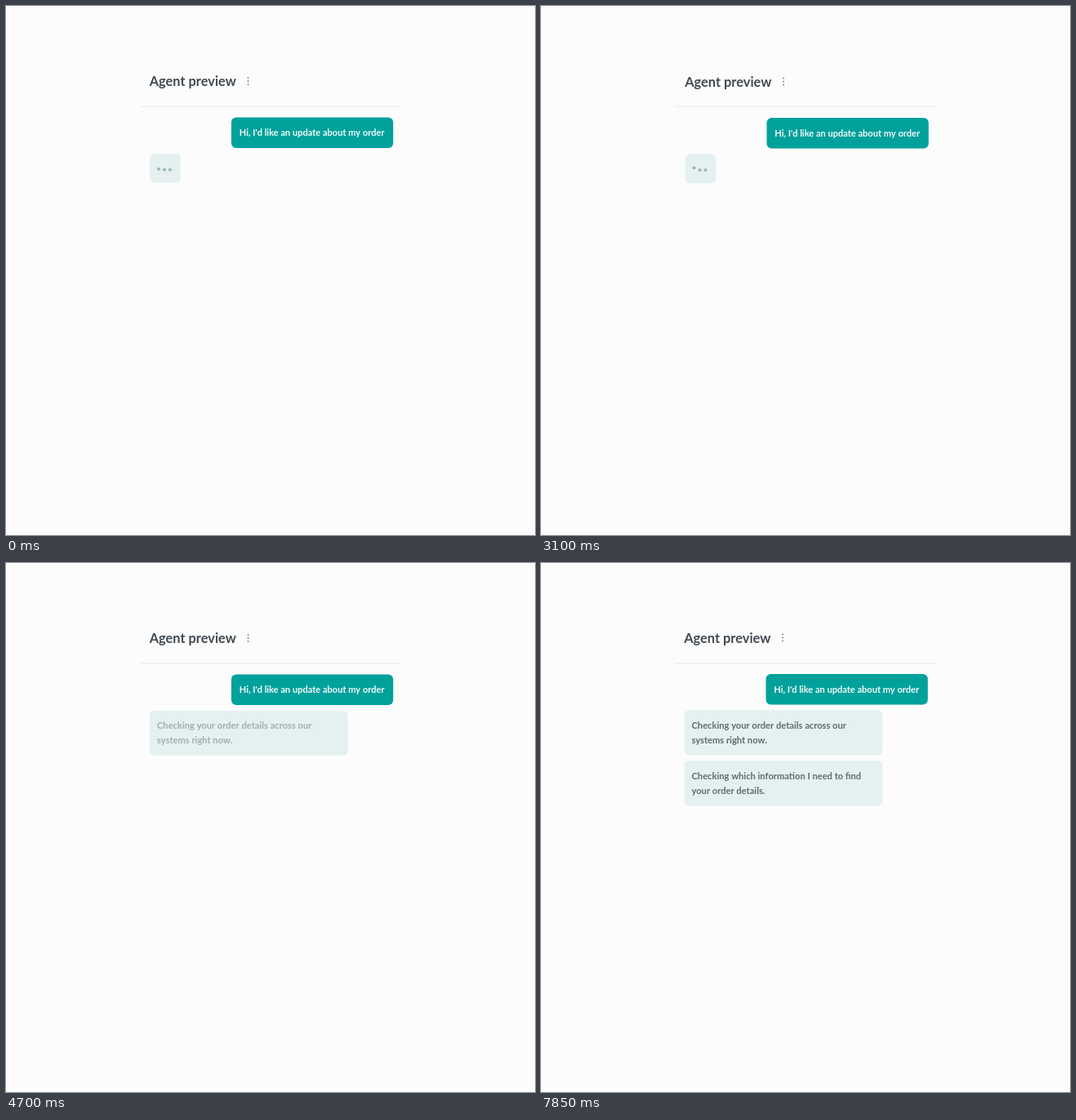
An HTML page with a canvas for the animation above (8000 ms loop, 648 px wide and 648 px high).

```html
<!DOCTYPE html>
<html lang="en">
<head>
<meta charset="utf-8">
<title>Agent preview</title>
<style>
html, body { margin: 0; width: 100%; height: 100%; overflow: hidden; background: #fcfcfc; }
canvas { display: block; width: 648px; height: 648px; }
</style>
</head>
<body>
<canvas id="stage" width="648" height="648"></canvas>
<script>
const ctx = document.getElementById('stage').getContext('2d');
const LOOP = 8000;
const STEP = 50;
const MINT = '#e5f1f1';
const REPLY = '#5d6c70';

const clamp = v => Math.min(1, Math.max(0, v));
const progress = (t, from, to) => clamp((t - from) / (to - from));
const easeOut = p => 1 - (1 - p) ** 3;
const mix = (a, b, p) => a + (b - a) * p;

function box(x, y, w, h, color) {
  ctx.fillStyle = color;
  ctx.beginPath();
  ctx.roundRect(x, y, w, h, 6);
  ctx.fill();
}

function dot(x, y, r, color) {
  ctx.fillStyle = color;
  ctx.beginPath();
  ctx.arc(x, y, r, 0, Math.PI * 2);
  ctx.fill();
}

function text(str, x, y, size, color) {
  ctx.font = `700 ${size}px Lato, sans-serif`;
  ctx.fillStyle = color;
  ctx.fillText(str, x, y);
}

function withAlpha(alpha, draw) {
  if (alpha <= 0) return;
  ctx.save();
  ctx.globalAlpha = alpha;
  draw();
  ctx.restore();
}

// The whole panel sways by a fraction of a pixel.
function drift(t) {
  return 0.5 * (progress(t, 1000, 1400) - progress(t, 3100, 3800) - progress(t, 5300, 5600));
}

function header() {
  text('Agent preview', 175.7, 98, 16.4, '#414a51');
  for (let i = 0; i < 3; i++) dot(296.6, 88 + i * 4, 0.95, '#7c8388');
}

function divider() {
  ctx.fillStyle = '#ececec';
  ctx.fillRect(164, 122.5, 320, 1);
}

function question() {
  box(276, 136.5, 198.3, 37.5, '#00a19b');
  text("Hi, I'd like an update about my order", 285.8, 159.3, 11.07, '#f2fbfa');
}

// Each dot hops in turn once per second; the last round resumes late.
function typingDots(t) {
  const resting = t >= 4000 && t < 4300;
  const phase = resting ? 0 : t % 1000 + 30;
  for (let i = 0; i < 3; i++) {
    const hop = Math.sin(Math.PI * progress(phase, i * 150, i * 150 + 450));
    dot(187 + i * 7, 200.5 - 3.5 * hop, 2.1, '#9db9ba');
  }
}

function replyLines(lines, y) {
  lines.forEach((line, i) => text(line, 185, y + i * 18, 11.15, REPLY));
}

function firstReply(t) {
  const grow = easeOut(progress(t, 4400, 4700));
  box(176, 180.8, mix(37.8, 242.8, grow), mix(35.8, 55.2, grow), MINT);
  withAlpha(1 - progress(t, 4400, 4550), () => typingDots(t));
  withAlpha(progress(t, 4550, 4850), () =>
    replyLines(['Checking your order details across our', 'systems right now.'], 203.4));
}

function secondReply(t) {
  withAlpha(progress(t, 7700, 7850), () => {
    box(176, 242.8, 242.8, 55.2, MINT);
    replyLines(['Checking which information I need to find', 'your order details.'], 265.5);
  });
}

function frame() {
  const t = Math.floor(performance.now() % LOOP / STEP) * STEP;
  ctx.fillStyle = '#fcfcfc';
  ctx.fillRect(0, 0, 648, 648);
  divider();
  ctx.save();
  ctx.translate(drift(t), drift(t));
  header();
  question();
  firstReply(t);
  secondReply(t);
  ctx.restore();
  requestAnimationFrame(frame);
}
frame();
</script>
</body>
</html>
```
